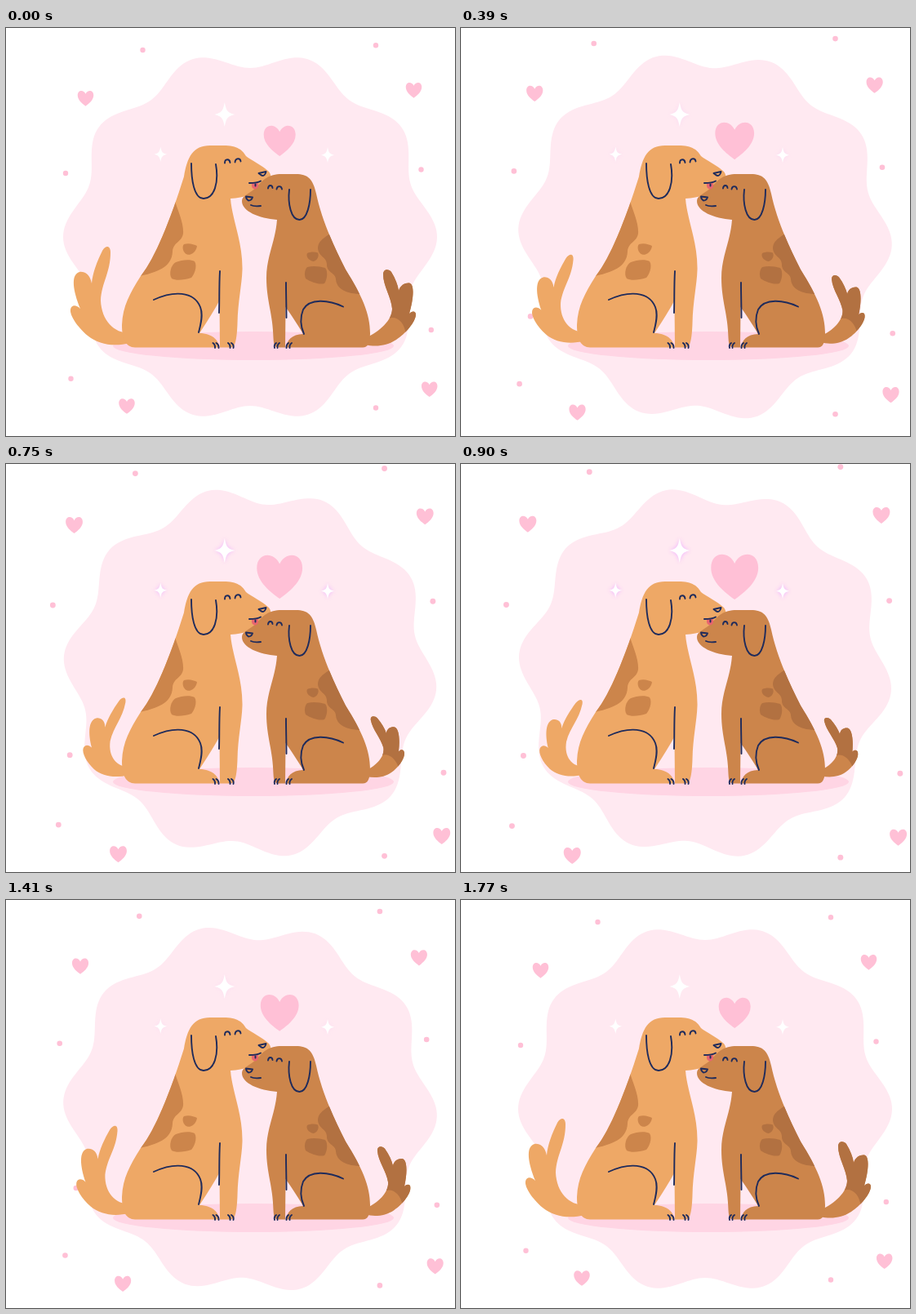
These frames come from a looping animation (550x500 px, 1800 ms). An HTML page:

```html
<!DOCTYPE html>
<html lang="en">
<head>
<meta charset="utf-8">
<title>Two dogs</title>
<style>
  html, body { margin: 0; width: 100%; height: 100%; overflow: hidden; background: #fff; }
  svg { display: block; width: 550px; height: 500px; }
  .tan { fill: #eea866; }
  .brown { fill: #cc854b; }
  .dark { fill: #b27141; }
  .pink { fill: #ffc0d6; }
  .line { fill: none; stroke: #1f2b5b; stroke-width: 1.9; stroke-linecap: round; stroke-linejoin: round; }
</style>
</head>
<body>
<svg viewBox="0 0 550 500">
  <defs>
    <path id="heart" d="M0 18.7C-8 13-19.5 4-19.5-7.5C-19.5-21-5-22 0-11C5-22 19.5-21 19.5-7.5C19.5 4 8 13 0 18.7Z"/>
    <path id="star" d="M0-15C1.8-4.5 4-1.8 12.5 0C4 1.8 1.8 4.5 0 15C-1.8 4.5-4 1.8-12.5 0C-4-1.8-1.8-4.5 0-15Z"/>
    <path id="bodyL" d="M218 182C222 158 229 144 250 144H266C284 144 290 150 294 157C300 162 315 169 322 176C326 181 325 187 318 193C306 203 292 208 275 209C277 235 290 262 289.5 296C289 315 284 335 283.5 362C283 375 282 384 279.500 389Q278 391.500 274 391.500H262L261.500 334C254 348 246 360 237 374C250 374 261 381 261 391.500H158C147 391 142 382 142 364C143 340 152 325 165 304C184 280 203 230 218 182Z"/>
    <path id="bodyR" d="M289 212C289 205 299 203 307 195C315 186 321 179 338 179H355C370 179 376 185 380 203C386 232 400 265 416 296C436 328 446 350 446 374C446 386 443 391.500 437 391.500H343.500C343.500 383 350 375.500 364 375C357 363 349 351 342.500 342L342 391.500H334C329 391.500 328 388 327.500 380C327 350 319 335 319 306C319 280 330 262 332 235C310 233 289 225 289 212Z"/>
    <path id="wagR" d="M440 380C458 372 473 358 473 344C472 330 462 316 462 302C462 295 469 295 472 299C477 307 480 315 481 322C483 315 489 312 494 312.500C501 314 499 333 494 350C498 346 502 347 502 351C502 360 489 375 478 382C466 390 452 391 440 388Z"/>
    <clipPath id="clipL"><use href="#bodyL"/></clipPath>
    <clipPath id="clipR"><use href="#bodyR"/></clipPath>
    <clipPath id="clipTail"><use href="#wagR"/></clipPath>
  </defs>

  <path id="badge" fill="#ffe9f1"/>
  <ellipse cx="303" cy="389.500" rx="172" ry="17.500" fill="#ffd5e4"/>
  <g id="confetti" class="pink"></g>
  <use id="love" href="#heart" class="pink"/>
  <g id="stars" fill="#fff"></g>

  <g id="tailL">
    <path class="tan" d="M152 374C132 374 117 358 116 334C117 312 128 300 128 275C128 266 122 266 118 273C112 285 106 300 105 313C103 302 96 298 90 299C79 302 82 322 91 344C86 339 80 339 79 345C78 352 87 366 100 377C114 388 132 391 152 386Z"/>
  </g>
  <g id="tailR">
    <use href="#wagR" class="brown"/>
    <path class="dark" clip-path="url(#clipTail)" d="M464 358C476 350 488 358 490 376L520 350V280H450Z"/>
  </g>

  <g>
    <use href="#bodyL" class="tan"/>
    <path class="brown" clip-path="url(#clipL)" d="M207 212C211 225 218 240 217 252C215 263 205 262 204 274C203 290 192 298 164 304L140 290L190 212Z"/>
    <path class="brown" d="M218 265C224 263 230 265 234 267C233 275 226 279 222 277.500C217 276 215 268 218 265Z"/>
    <path class="brown" d="M208 287C215 284 226 283 231 286C235 292 230 303 227 306C218 309 208 310 203 307C199 302 202 290 208 287Z"/>
    <path class="line" d="M227 166C227 185 230 209 242 209C255 209 261 190 257 167M268 165.500C268 160 274 160 274.500 165M280.500 164.500C281 159 287 159 287.500 163.500M309.500 178L318.500 176C318 179 316 181 314.500 181C312.500 181 311 179 309.500 178Z"/>
    <path class="line" d="M262 298C261 315 261.500 332 261 349M181 333C205 322 230 322 238 342C242 352 238 365 236 373M253.500 386q3 2 2.500 6M257.500 386q3.500 2 3 6M272 386q3 2 2.500 6M276 386q3.500 2 2.500 6"/>
  </g>

  <g>
    <use href="#bodyR" class="brown"/>
    <path class="dark" clip-path="url(#clipR)" d="M397 252C390 257 382 261 382 270C383 281 393 280 393 290C393 300 404 300 404 308C405 320 417 326 436 326L450 300Z"/>
    <path class="dark" d="M369 276C373 274 378 274 382 275.500C384 280 381 285 376.500 286C371 285 367 280 369 276Z"/>
    <path class="dark" d="M369 293C376 291 384 292 391 294C395 299 393 309 390 313C383 315 373 311 367 307C365 302 366 296 369 293Z"/>
    <path class="line" d="M347 198C345 215 349 235 359.500 235C369 235 373 215 373 198M321 196.500C321.500 192 326 192 326.500 196M331.500 197.500C332 193 337.500 193 338 197.500M294 206.500L302 207.500C301 210.500 298.500 211.500 297 211.500C295.500 210.500 294 209 294 206.500ZM300 217C303 218.500 308 218.500 312 218"/>
    <path class="line" d="M343 312C343 326 343.500 340 343.500 355M413 341.500C395 333 372 331 364 345C360 355 361 366 365 375M331 386q-3 2-2 6M335 386q-3 2-2.500 6M346 386q-3 2-2.500 6M350 386q-3 2-2.500 6"/>
  </g>

  <path fill="#e8666f" d="M301 190L309 189.500V194C308 198.500 302 198.500 301 194Z"/>
  <path class="line" d="M298 190C303 190 308 190 312 187.500M305.500 190V193.500"/>
</svg>
<script>
  const $ = id => document.getElementById(id);

  function add(parent, tag, attrs) {
    const el = document.createElementNS('http://www.w3.org/2000/svg', tag);
    for (const key in attrs) el.setAttribute(key, attrs[key]);
    $(parent).append(el);
  }

  // Ten soft lobes around the badge centre
  let outline = '';
  for (let deg = 0; deg < 360; deg++) {
    const a = deg * Math.PI / 180, r = 218 + 11 * Math.cos(10 * a);
    outline += (deg ? 'L' : 'M') + (299 + r * Math.cos(a)).toFixed(2) + ' ' + (256 + r * Math.sin(a)).toFixed(2);
  }
  $('badge').setAttribute('d', outline + 'Z');

  const dots = [[167.5, 27], [453, 21.3], [73, 178], [508.5, 173.5], [92.5, 349.8], [520.8, 370], [79.5, 429.7], [453, 465.5]];
  const hearts = [[97.5, 86.3], [499.5, 76.3], [148, 463.5], [518.7, 442.7]];
  const sparkles = [[267.8, 106, 1], [189.3, 154.7, 0.62], [394, 155.7, 0.64]];

  dots.forEach(([cx, cy]) => add('confetti', 'circle', { cx, cy, r: 3.2 }));
  hearts.forEach(([x, y]) => add('confetti', 'use', { href: '#heart', transform: `translate(${x} ${y}) scale(.5)` }));
  sparkles.forEach(([x, y, s]) => add('stars', 'use', { href: '#star', transform: `translate(${x} ${y}) scale(${s})` }));

  const LOOP = 1800, STEP = 30, PEAK = 870, END = 1770;
  const move = (id, value) => $(id).setAttribute('transform', value);
  const about = (x, y, change) => `translate(${x} ${y}) ${change} translate(${-x} ${-y})`;

  // Tails squash and lean towards the body; side is the lean direction
  const wag = (p, side) => `matrix(${1 - 0.176 * p} 0 ${side * 0.168 * p} ${1 - 0.23 * p} 0 0)`;

  function draw(ms) {
    const t = Math.floor((ms % LOOP) / STEP) * STEP;
    const p = t <= PEAK ? t / PEAK : (END - t) / (END - PEAK);
    move('badge', `rotate(${6 * p} 299 256)`);
    move('confetti', about(300, 250, `scale(${1 + 0.08 * p})`));
    move('love', `translate(335.2 138.3) scale(${1 + 0.5 * p})`);
    move('tailL', about(166, 362, wag(p, -1)));
    move('tailR', about(419.5, 362, wag(p, 1)));
    const glow = Math.max(0, (p - 0.3) / 0.7);
    $('stars').style.filter = glow ? `drop-shadow(0 0 2.5px rgba(238,170,255,${glow}))` : 'none';
  }

  const start = performance.now();
  function tick() {
    draw(performance.now() - start);
    requestAnimationFrame(tick);
  }
  tick();
</script>
</body>
</html>
```
